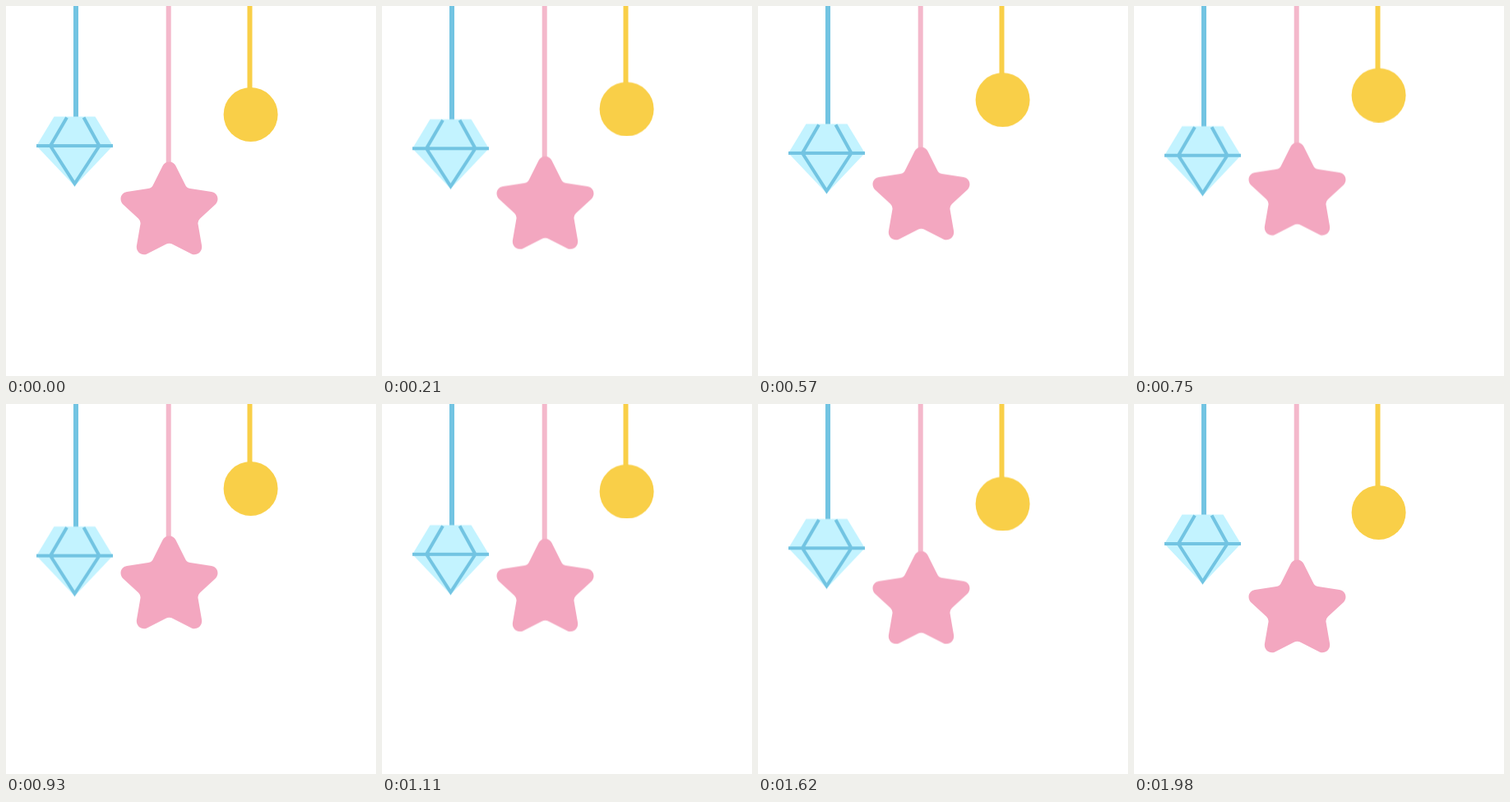
Recreate the animation shown at these times as an HTML page. Size 450 by 450 pixels, loop 2.01 s.

```html
<!DOCTYPE html>
<html lang="en">
<head>
<meta charset="utf-8">
<title>Hanging charms</title>
<style>
  html, body { margin: 0; width: 100%; height: 100%; overflow: hidden; background: #fff; }
  svg { display: block; width: 100vw; height: 100vh; }
  g { animation: bob 2010ms linear infinite; }
  .gem { --travel: 15px; }
  .star, .ball { --travel: -30px; }

  /* out by 960 ms, back by 1980 ms, then one short rest */
  @keyframes bob {
    0%, 98.5075%, 100% { transform: translateY(0); }
    47.7612% { transform: translateY(var(--travel)); }
  }
</style>
</head>
<body>
<svg viewBox="0 0 450 450">
  <g class="gem">
    <path d="M85 -40V135" stroke="#72c4e2" stroke-width="6"/>
    <path d="M58.5 134.5H108.5L130 170L83.5 219L37 170Z" fill="#c3f3ff"/>
    <path d="M37 170H130M74 135.5L54 170L83.5 216L113.5 170L94.5 135.5" fill="none" stroke="#72c4e2" stroke-width="4"/>
  </g>
  <g class="star">
    <path d="M197.7 -40V195" stroke="#f4b8cb" stroke-width="6"/>
    <path fill="#f3a7c0" d="M198.5 189.5C202.5 189.5 205 191.5 206.5 194.5L217.5 216.5Q219.5 221.5 224 222L250 226C257 227 260 235 255 241L236 258.5Q233 261.5 233.5 265L238 291C239.5 299 232 304.5 225.5 301.5L203 290Q198.5 287.5 194 290L171.5 301.5C165 304.5 157.5 299 159 291L163.5 265Q164 261.5 161 258.5L142 241C137 235 140 227 147 226L173 222Q177.5 221.5 179.5 216.5L190.5 194.5C192 191.5 194.5 189.5 198.5 189.5Z"/>
  </g>
  <g class="ball">
    <path d="M296.5 -40V110" stroke="#f9cf48" stroke-width="6"/>
    <circle cx="297.6" cy="132" r="33" fill="#f9cf48"/>
  </g>
</svg>
</body>
</html>
```
